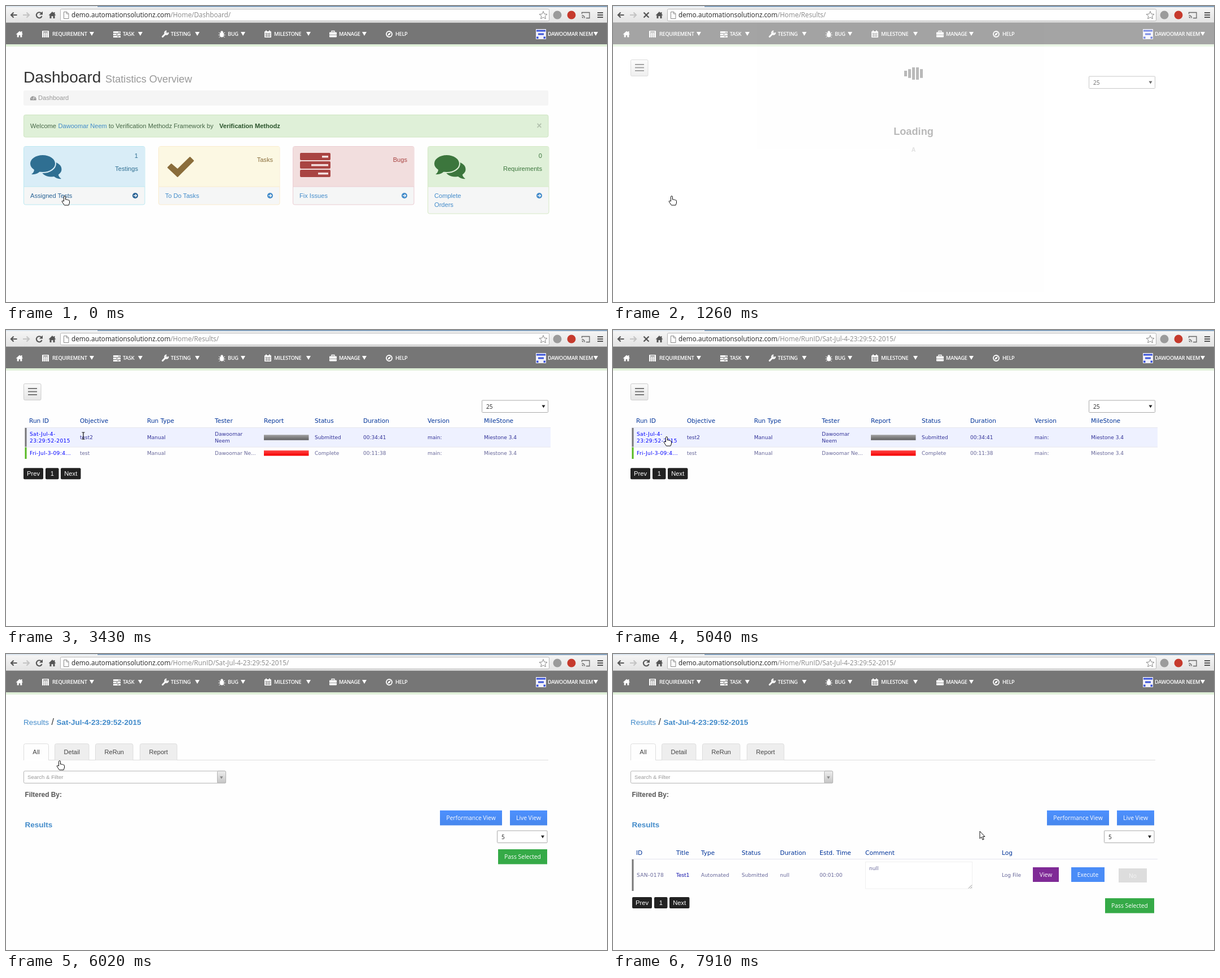
Write an HTML page that moves like this. It is 1065x526 px and loops after 8000 ms.

```html
<!DOCTYPE html>
<html lang="en">
<head>
<meta charset="utf-8">
<title>Dashboard walkthrough</title>
<style>
html, body { margin: 0; width: 100%; height: 100%; overflow: hidden; background: #fefefe; }
svg { display: block; }
text { white-space: pre; font-family: "Liberation Sans", Arial, sans-serif; }
.ui { font-family: "Open Sans", "Noto Sans", sans-serif; }
.nav { font-family: "Open Sans", "Noto Sans", sans-serif; font-weight: 600; letter-spacing: -.3px; }
.grid { font-family: "DejaVu Sans", sans-serif; }
.code { font-family: "DejaVu Sans", sans-serif; letter-spacing: .35px; }
.b { font-weight: bold; }
.mid { text-anchor: middle; }
.end { text-anchor: end; }
</style>
</head>
<body>
<svg id="stage" width="1065" height="526" viewBox="0 0 1065 526"></svg>
<script>
const LOOP = 8000, STEP = 70;
const LINK = '#428bca', HEAD = '#039', CELL = '#669', DARK_CELL = '#339';
const PERSON = ['Dawoomar', 'Neem'], COMPANY = 'Verification Methodz';
const RUN = 'Sat-Jul-4-23:29:52-2015';

// Markup helpers
const text = (x, y, size, str, fill, cls = '') =>
  `<text x="${x}" y="${y}" font-size="${size}" fill="${fill}" class="${cls}">${str}</text>`;
const rect = (x, y, w, h, fill, stroke = 'none', rx = 0) =>
  `<rect x="${x}" y="${y}" width="${w}" height="${h}" fill="${fill}" stroke="${stroke}" rx="${rx}"/>`;
const fillPath = (d, fill, extra = '') => `<path d="${d}" fill="${fill}" ${extra}/>`;
const line = (d, stroke, width = 1, extra = '') =>
  `<path d="${d}" fill="none" stroke="${stroke}" stroke-width="${width}" ${extra}/>`;
const circle = (x, y, r, fill) => `<circle cx="${x}" cy="${y}" r="${r}" fill="${fill}"/>`;
const ellipse = (x, y, rx, ry, fill, stroke = 'none') =>
  `<ellipse cx="${x}" cy="${y}" rx="${rx}" ry="${ry}" fill="${fill}" stroke="${stroke}" stroke-width="2"/>`;
const caret = (x, y, w, h, fill) => fillPath(`M${x} ${y}h${w}l${-w / 2} ${h}Z`, fill);
const group = (id, body) => `<g id="${id}">${body}</g>`;
const gradient = (id, from, to) =>
  `<linearGradient id="${id}" x2="0" y2="1"><stop stop-color="${from}"/><stop offset="1" stop-color="${to}"/></linearGradient>`;
const button = (x, y, w, h, fill, label, color = '#fff') =>
  rect(x, y, w, h, fill) + text(x + w / 2, y + h / 2 + 4, 10.3, label, color, 'ui mid');
const select = (x, y, w, value) =>
  rect(x, y, w, 21.5, '#fff', '#aaa', 1) + text(x + 7.5, y + 14.5, 10, value, '#222', 'ui') +
  caret(x + w - 11, y + 8.5, 6, 5, '#222');

function browser() {
  const ink = '#555';
  return rect(0, 0, 1065, 30, 'url(#bar)') + rect(0, 0, 161, 2, '#dbe5ee') + rect(162, 0, 903, 2, '#86a3c0') +
    line('M0 29.5H1065', '#b4b4b4') +
    line('M19.500 16H9M13.500 11.500L9 16L13.500 20.500', ink, 2.2) +
    line('M30 16H41M36.500 11.500L41 16L36.500 20.500', '#c4c4c4', 2.2) +
    group('reload', line('M62.8 13A5 5 0 1 0 63.6 18', ink, 2.1) + fillPath('M65 9.500V15.500H59Z', ink)) +
    group('stop', line('M54.500 11.500L63.500 20.500M63.500 11.500L54.500 20.500', ink, 2.3)) +
    fillPath('M75.500 16.500L82 10L84.500 12.500V11H86.500V14.500L88.500 16.500H86.500V22H83.500V18H80.500V22H77.500V16.500Z', ink) +
    rect(96.5, 5.5, 866, 21, '#fff', '#b5b5b5', 2) +
    line('M102.500 10.500H108L111 13.500V22.500H102.500ZM107.500 10.500V14H111', '#888') +
    `<text x="116" y="20.300" font-size="11.750" class="ui" fill="#222">demo.automationsolutionz.com<tspan id="path" fill="#888"></tspan></text>` +
    line('M952 9.500L954 14.200L959 14.600L955.200 17.900L956.400 22.700L952 20.100L947.600 22.700L948.800 17.900L945 14.600L950 14.200Z', '#888') +
    circle(977, 16, 7.5, '#9b9b9b') + circle(1002, 16, 7.5, '#c63a2d') +
    line('M1020.500 14V11.500H1034V21.500H1028M1020.500 16.500A5 5 0 0 1 1025.500 21.500M1020.500 19.500A2 2 0 0 1 1022.500 21.500', '#666', 1.3) +
    line('M1048 12H1058M1048 16H1058M1048 20H1058', ink, 2.2);
}

function navbar() {
  const w = '#fff', gap = '#777';
  const menus = [['REQUIREMENT', 82, 148], ['TASK', 207, 234], ['TESTING', 292, 335], ['BUG', 393, 416],
    ['MILESTONE', 475, 532], ['MANAGE', 590, 631], ['HELP', 690], [PERSON.join(' ').toUpperCase(), 960, 1041]];
  const dots = [67, 70, 73].map(x => [48, 51, 54].map(y => rect(x - 1, y, 1.6, 1.6, gap)).join('')).join('');
  const server = [45, 49, 53].map((y, i) => rect(190, y, 13, 3, w, 'none', .5) + rect([199, 195, 197][i], y + 1, 3, 1, gap)).join('');
  const icons =
    fillPath('M17.500 50.500L24 44.500L26.500 46.800V45H28.500V48.600L30 50.500H28.300V55.500H25.300V52H22.700V55.500H19.700V50.500Z', w) +
    rect(64, 44, 12, 12, w, 'none', 1) + rect(66, 45.5, 8, 1.5, gap) + dots + server +
    line('M277.500 54.500L284 48', w, 3, 'stroke-linecap="round"') + line('M287.300 47A3 3 0 1 1 284.500 44.700', w, 2.2) +
    ellipse(382.5, 51, 3.5, 4.5, w) + circle(382.5, 46.5, 2.2, w) +
    line('M377 47L380 49M388 47L385 49M376.500 51.500H388.500M377.500 56L380 53.500M387.500 56L385 53.500', w) +
    rect(458, 45, 12, 11, w, 'none', 1) + line('M461 43.500V47M467 43.500V47', w, 2) +
    line('M459 48.500H469M459 51.200H469M459 53.800H469M462 48.500V55M466 48.500V55', gap, .8) +
    rect(573, 46.500, 13, 9, w, 'none', 1) + line('M577 46.500V44.500H582V46.500', w, 1.3) + line('M573 51.300H586', gap, .8) +
    `<circle cx="679" cy="50" r="5" fill="none" stroke="#fff" stroke-width="1.800"/>` +
    fillPath('M682 47L680.300 51.300L676 53L677.700 48.700Z', w);
  const blue = '#3c55d8';
  const avatar = rect(939, 41, 18, 18, '#efeffa') + rect(940, 42.5, 16, 3, blue) + rect(943, 48.5, 10, 3, blue) +
    rect(940, 54.5, 3.5, 3.5, blue) + rect(952.5, 54.5, 3.5, 3.5, blue);
  return rect(0, 30, 1065, 38, '#767676') + rect(0, 68, 1065, 4, '#dff0d8') + icons + avatar +
    menus.map(([label, x, arrow]) => text(x, 53, 9.2, label, w, 'nav') + (arrow ? caret(arrow, 46, 8, 7, w) : '')).join('');
}

function cardIcon(kind, x, color, back) {
  if (kind === 'check')
    return fillPath(`M${x + 17} 287l6-6 11 9.500 22-21.500 6 6-28 28Z`, color, `stroke="${color}" stroke-width="2" stroke-linejoin="round"`);
  if (kind === 'bars')
    return [29, 10, 22].map((slot, i) =>
      rect(x + 13, 261 + i * 15, 54, 13, color, 'none', 2) +
      rect(x + 13 + [39, 20, 32][i], 266 + i * 15, 50 - [39, 20, 32][i], 3.5, back)).join('');
  return ellipse(x + 49, 290, 18.5, 13.5, color) + fillPath(`M${x + 61} 297q1 7 6 10q-8 1-14-5Z`, color) +
    ellipse(x + 34, 280, 23, 16, color, back) + fillPath(`M${x + 19} 290q0 6-5 9q10 1 15-5Z`, color);
}

function dashboard() {
  const cards = [
    [31, 'chat', '#d9edf7', '#bce8f1', '#2f6f92', '1', 'Testings', ['Assigned Tests']],
    [270, 'check', '#fcf8e3', '#faebcc', '#8a6d3b', '', 'Tasks', ['To Do Tasks']],
    [508, 'bars', '#f2dede', '#ebccd1', '#a94442', '', 'Bugs', ['Fix Issues']],
    [747, 'chat', '#dff0d8', '#d6e9c6', '#3c763d', '0', 'Requirements', ['Complete', 'Orders']]];
  const card = ([x, kind, back, border, color, count, title, links], i) => {
    const link = i ? LINK : '#2a6496', h = links.length > 1 ? 119.5 : 103.5;
    return rect(x + .5, 249.5, 214.5, h, '#f5f6f6', border, 3) + rect(x + 1, 250, 213.5, 71, back) +
      line(`M${x + .5} 321H${x + 215}`, border) + cardIcon(kind, x, color, back) +
      text(x + 203, 270, 11.1, count, color, 'end') + text(x + 203, count ? 293 : 277, 11.1, title, color, 'end') +
      links.map((s, n) => text(x + 12, 341 + n * 15.5, 11.1, s, link)).join('') +
      circle(x + 198, 337, 5, link) + line(`M${x + 195} 337h5.500m-2.500-2.500l2.500 2.500l-2.500 2.500`, '#f5f6f6', 1.3);
  };
  return text(31, 135.5, 28.1, 'Dashboard', '#333') + text(176, 135.5, 18.2, 'Statistics Overview', '#999') +
    rect(31, 150, 930, 27, '#f5f5f5', 'none', 3) +
    fillPath('M43 167.500A5.500 5.500 0 1 1 53.500 167.500Z', '#999') + line('M48.200 166L50 161M45 164h1.500M50.500 164h1.500', '#f5f5f5', 1.1) +
    text(57, 167, 11.1, 'Dashboard', '#999') +
    rect(31.5, 193.5, 929.5, 39.5, '#dff0d8', '#cfe5c3', 3) +
    text(43, 217, 11.1, 'Welcome', '#456646') + text(92.5, 217, 11.1, PERSON.join(' '), LINK) +
    text(182, 217, 11.1, `to ${COMPANY} Framework by`, '#456646') + text(378, 217, 11.1, COMPANY, '#2b542c', 'b') +
    text(945, 218, 16, '×', '#b3c2ae', 'b mid') + cards.map(card).join('');
}

const pager = (x, y) => [[0, 35, 'Prev'], [39, 23.5, '1'], [66, 35.5, 'Next']].map(([dx, w, s]) =>
  rect(x + dx, y, w, 20, '#222', 'none', 2) + text(x + dx + w / 2, y + 14, 11.2, s, '#fff', 'mid')).join('');

const headings = (y, cols) => cols.map(([x, s]) => text(x, y, 10.6, s, HEAD, 'grid')).join('');

const runs = [
  { short: 'Sat-Jul-4-23:2...', full: ['Sat-Jul-4-', '23:29:52-2015'], mark: '#777', bar: 'url(#gray)',
    cells: ['test2', 'Manual', 'Submitted', '00:34:41', 'main:', 'Miestone 3.4'] },
  { short: 'Fri-Jul-3-09:4...', full: ['Fri-Jul-3-', '09:41:27-2015'], mark: '#55b81f', bar: 'url(#red)',
    cells: ['test', 'Manual', 'Complete', '00:11:38', 'main:', 'Miestone 3.4'] }];

// The hovered row grows and shows its long values in two lines.
function runTable(hovered) {
  const cellX = [131, 250, 547, 633, 747, 847];
  let y = 173.5, out = headings(165, [[41, 'Run ID'], [131, 'Objective'], [250, 'Run Type'], [370, 'Tester'],
    [457, 'Report'], [547, 'Status'], [633, 'Duration'], [747, 'Version'], [847, 'MileStone']]);
  runs.forEach((run, i) => {
    const hot = i === hovered, h = hot ? 34.5 : 21, mid = y + h / 2, base = mid + 3.3, color = hot ? DARK_CELL : CELL;
    const pair = (x, words, fill, cls) => words.map((s, n) => text(x, base - 6.3 + n * 12.6, 9.1, s, fill, cls)).join('');
    if (hot) out += rect(33, y, 932, h, '#eef1ff');
    out += line(`M33 ${y}H965`, '#e6e6ee') + rect(33.5, y + .5, 3, h - .5, run.mark) + rect(457, mid - 4.5, 79.5, 9.5, run.bar) +
      (hot ? pair(42, run.full, '#00f', 'code') : text(42, base, 9.1, run.short, '#00f', 'code')) +
      (hot ? pair(370, PERSON, color, 'grid') : text(370, base, 9, `${PERSON[0]} ${PERSON[1].slice(0, 2)}...`, color, 'grid')) +
      run.cells.map((s, n) => text(cellX[n], base, 9, s, color, 'grid')).join('');
    y += h;
  });
  return out + pager(31, y + 16.3);
}

const resultsPage = () =>
  rect(31.5, 95.5, 30.5, 29, 'url(#soft)', '#ccc', 2) + line('M39 104H55M39 109.500H55M39 115H55', '#777', 2.2) +
  select(843.5, 125, 117, '25') + [0, 1, 2].map(i => group('table' + i, runTable(i - 1))).join('');

function runPage() {
  const tab = (x, w, s, id) => `<path id="${id}" d="M${x} 188.500V162.500q0-3 3-3h${w - 6}q3 0 3 3V188.500" fill="${id === 'all' ? '#fefefe' : '#eee'}" stroke="#ddd"/>` +
    text(x + w / 2, 178, 11.1, s, '#444', 'mid');
  const cells = [[156, 'Automated'], [228, 'Submitted'], [296, 'null'], [366, '00:01:00'], [689, 'Log File']];
  const table = headings(356.5, [[41, 'ID'], [112, 'Title'], [156, 'Type'], [228, 'Status'], [296, 'Duration'],
    [366, 'Estd. Time'], [447, 'Comment'], [689, 'Log']]) +
    line('M33 364.500H965', '#e4e4ee') + rect(33.5, 365, 3, 56, '#777') +
    text(42, 396, 9.1, 'SAN-0178', CELL, 'code') + text(112, 395.5, 9, 'Test1', '#11a', 'grid') +
    cells.map(([x, s]) => text(x, 395.5, 9, s, CELL, 'grid')).join('') +
    rect(447.5, 369.5, 189, 47.5, '#fff', '#f0f0f0') + text(454, 384, 9, 'null', CELL, 'grid') +
    line('M630 416.500L636 410.500M633.500 416.500L636 414', '#888') +
    button(744, 379, 46, 26, '#7f2a96', 'View') + button(812, 379, 59, 26, '#4a8cf7', 'Execute') +
    button(896, 381, 50, 25, '#ddd', 'No', '#f4f4f4') + pager(34, 432);
  return text(31, 125.5, 13.5, 'Results', LINK) + text(80.5, 126, 16, '/', '#333') + text(89.5, 125.5, 13.5, RUN, LINK, 'b') +
    line('M31 188.500H961', '#ddd') + tab(31.5, 44, 'All', 'all') + line('M32 188.500H75', '#fefefe', 1.5) +
    tab(86.5, 60.5, 'Detail', 'detail') + tab(158.5, 66.5, 'ReRun', 'rerun') + tab(237.5, 65.5, 'Report', 'report') +
    rect(31.5, 208, 358, 21.5, '#fff', '#b5b5b5', 2) + rect(374.5, 208, 15, 21.5, 'url(#drop)', '#b5b5b5', 2) +
    caret(379, 217.5, 5.5, 4.5, '#888') + text(38, 222, 9.6, 'Search &amp; Filter', '#999') +
    text(33.5, 253.5, 11.9, 'Filtered By:', '#555', 'b') + text(33.5, 308, 13.5, 'Results', LINK, 'b') +
    button(769, 278, 110, 26.5, 'url(#blue)', 'Performance View') + button(893, 278, 66, 26.5, 'url(#blue)', 'Live View') +
    select(870.5, 314, 88.5, '5') + group('pass', button(872, 347, 87, 26.5, '#35aa47', 'Pass Selected')) + group('detailTable', table);
}

const loader = () => rect(0, 30, 1065, 496, '#fefefe') +
  [0, 1, 2, 3, 4].map(i => `<rect class="wave" x="${516 + i * 7}" width="5" fill="#333"/>`).join('') +
  text(532.5, 229, 18.2, 'Loading', '#333', 'b mid') + text(532.5, 259, 10.5, 'A', '#aaa', 'b mid');

const outline = 'stroke="#111" stroke-linejoin="round"';
const cursors =
  group('hand', fillPath('M-1.500 9V1.200a1.500 1.500 0 0 1 3 0V6q1.500-1 2.600.4 1.600-.7 2.400.6 2-.4 2 1.600v3.400l-1.500 4H-.5l-4-6q-.8-1.800.8-1.900Z', '#fff', outline)) +
  group('arrow', fillPath('M0 0V13l3-2.800 2 5 2.200-1-2-4.700H9Z', '#fff', outline)) +
  group('beam', line('M-2.500-6H2.500M0-6V6M-2.500 6H2.500', '#111', 1.2));

const stage = document.getElementById('stage');
stage.innerHTML = '<defs>' + gradient('bar', '#f6f6f6', '#e3e3e3') + gradient('soft', '#fafafa', '#e6e6e6') +
  gradient('gray', '#a2a2a2', '#606060') + gradient('red', '#ff4a4a', '#f50000') + gradient('drop', '#eee', '#c4c4c4') +
  gradient('blue', '#4d90fe', '#4787ed') + '</defs>' + rect(0, 0, 1065, 526, '#fefefe') +
  navbar() + group('dashboard', dashboard()) + group('results', resultsPage()) + group('run', runPage()) +
  group('loader', loader()) + browser() + group('cursor', cursors);

const el = {};
stage.querySelectorAll('[id]').forEach(node => el[node.id] = node);
const waves = stage.querySelectorAll('.wave');
const show = (id, on) => el[id].style.display = on ? '' : 'none';

const FIRST_LOAD = 770, SECOND_LOAD = 5390, CLEAR = 560, FILLED = 700;

// Pointer: time, x, y
const track = [[0, 104, 338], [1960, 104, 338], [2030, 111, 331], [2310, 145, 289], [2520, 145, 289], [2870, 142, 205],
  [3010, 142, 205], [3150, 137.5, 190], [3220, 137.5, 190], [3290, 137, 188], [3430, 137, 188], [3640, 110, 190],
  [3710, 110, 190], [3850, 95, 190], [6510, 95, 190], [6720, 112, 172], [7070, 158, 290], [7280, 150, 354],
  [7350, 146, 357], [7420, 145, 361], [7700, 145, 361], [7910, 650, 315]];
const shapes = [[0, 'hand'], [FIRST_LOAD + CLEAR, 'arrow'], [2870, 'beam'], [3570, 'arrow'], [3780, 'hand'], [6860, 'arrow']];

function pointerAt(t) {
  const i = track.findIndex(key => key[0] > t);
  if (i < 0) return track[track.length - 1].slice(1);
  const [t0, x0, y0] = track[i - 1], [t1, x1, y1] = track[i], k = (t - t0) / (t1 - t0);
  return [x0 + (x1 - x0) * k, y0 + (y1 - y0) * k];
}

function render(t) {
  const stopping = (t >= 210 && t < FIRST_LOAD + CLEAR) || (t >= 4410 && t < SECOND_LOAD + CLEAR);
  show('stop', stopping);
  show('reload', !stopping);
  el.path.textContent = '/Home/' + (t < 350 ? 'Dashboard/' : t < 5040 ? 'Results/' : `RunID/${RUN}/`);

  show('dashboard', t < FIRST_LOAD);
  show('results', t >= FIRST_LOAD && t < SECOND_LOAD);
  show('run', t >= SECOND_LOAD);
  const hovered = t >= 3080 ? 1 : t >= 2870 ? 2 : 0;
  [0, 1, 2].forEach(i => show('table' + i, t >= FIRST_LOAD + FILLED && i === hovered));
  const filled = t >= SECOND_LOAD + FILLED;
  show('detailTable', filled);
  el.pass.setAttribute('transform', `translate(0 ${filled ? 87 : 0})`);
  el.detail.setAttribute('fill', t >= 6580 && t < 6860 ? '#ddd' : '#eee');

  const age = t - (t < SECOND_LOAD ? FIRST_LOAD : SECOND_LOAD);
  show('loader', age >= 0 && age < CLEAR);
  el.loader.style.opacity = Math.min(1, (CLEAR - age) / 210);
  waves.forEach((bar, i) => {
    const phase = ((age - i * 100 + 2400) % 1200) / 1200;
    const height = 10 + 15 * Math.max(0, 1 - Math.abs(phase - .2) / .2);
    bar.setAttribute('y', 120 - height / 2);
    bar.setAttribute('height', height);
  });

  const shape = shapes.filter(s => s[0] <= t).pop()[1];
  ['hand', 'arrow', 'beam'].forEach(id => show(id, id === shape));
  el.cursor.setAttribute('transform', `translate(${pointerAt(t).join(' ')})`);
}

function tick() {
  const ms = performance.now() % LOOP;
  render(Math.min(7910, Math.floor(ms / STEP) * STEP));
  requestAnimationFrame(tick);
}
tick();
</script>
</body>
</html>
```
